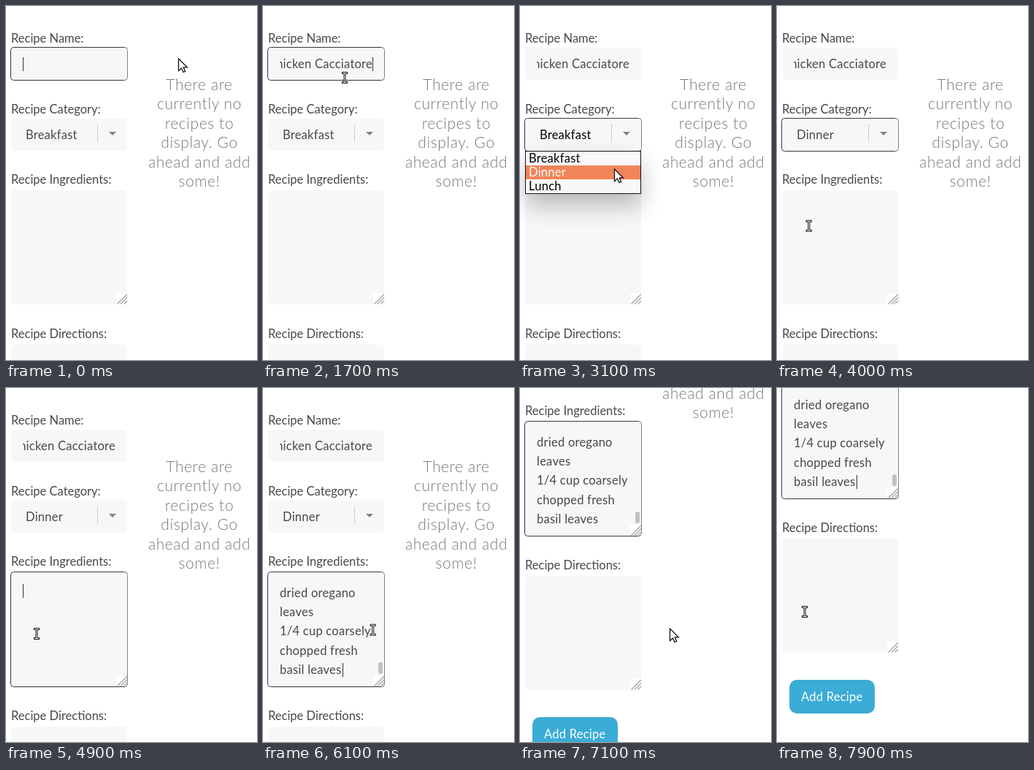
These frames come from a looping animation (344 by 484 pixels, 8000 ms). An HTML page:

```html
<!DOCTYPE html>
<html lang="en">
<head>
<meta charset="utf-8">
<title>Recipe form</title>
<style>
  html, body { margin: 0; width: 100%; height: 100%; overflow: hidden; background: #fff; }
  svg { display: block; width: 344px; height: 484px; }
  text { font: 16.5px Lato, "Open Sans", sans-serif; letter-spacing: .25px; fill: #484848; white-space: pre; }
  .label { letter-spacing: 0; }
  .field { fill: #f7f7f7; }
  .ring { fill: none; stroke: url(#edge); }
  .caret { fill: #333; }
  .note text { font-size: 21px; font-weight: 300; letter-spacing: .6px; fill: #777; text-anchor: middle; }
  .name { text-anchor: end; }
  .menu text { fill: #000; }
  .btn { fill: #fff; }

  /* Everything runs on one 8 s clock: 1.25% = 100 ms */
  .run { animation: 8s step-end infinite; }

  .page { animation-name: scroll; }
  @keyframes scroll {
    0% { transform: translateY(0); }
    82.5% { transform: translateY(-4px); }
    83.75% { transform: translateY(-17px); }
    85% { transform: translateY(-55px); }
    86.25% { transform: translateY(-108px); }
    87.5% { transform: translateY(-161px); }
    88.75% { transform: translateY(-206px); }
    90% { transform: translateY(-236px); }
    91.25% { transform: translateY(-252px); }
    92.5%, 100% { transform: translateY(-257px); }
  }

  .pointer { animation-name: move; }
  @keyframes move {
    0% { transform: translate(236px, 71px); }
    1.25% { transform: translate(236px, 71px); animation-timing-function: steps(5, start); }
    7.5% { transform: translate(106px, 96px); }
    21.25% { transform: translate(112px, 98px); }
    22.5% { transform: translate(112px, 98px); animation-timing-function: steps(5, start); }
    28.75% { transform: translate(142px, 172px); }
    33.75% { transform: translate(142px, 172px); animation-timing-function: steps(5, start); }
    40% { transform: translate(129px, 222px); }
    48.75% { transform: translate(129px, 222px); animation-timing-function: steps(3, start); }
    52.5% { transform: translate(1px, 340px); }
    53.75% { transform: translate(1px, 340px); animation-timing-function: steps(5, start); }
    60% { transform: translate(42px, 336px); }
    70% { transform: translate(42px, 336px); animation-timing-function: steps(9, start); }
    81.25% { transform: translate(205px, 328px); }
    95% { transform: translate(205px, 328px); animation-timing-function: steps(4, start); }
    100% { transform: translate(38px, 306px); }
  }
  .arrow { animation-name: arrow; }
  @keyframes arrow {
    0%, 22.5%, 51.25%, 77.5% { opacity: 1; }
    3.75%, 48.75%, 53.75%, 95%, 100% { opacity: 0; }
  }
  .beam { animation-name: beam; }
  @keyframes beam {
    0%, 22.5%, 51.25%, 77.5% { opacity: 0; }
    3.75%, 48.75%, 53.75%, 95%, 100% { opacity: 1; }
  }

  .name-ring { animation-name: name-ring; }
  @keyframes name-ring { 0% { opacity: 1; } 30%, 100% { opacity: 0; } }
  .cat-ring { animation-name: cat-ring; }
  @keyframes cat-ring { 0%, 61.25%, 100% { opacity: 0; } 30% { opacity: 1; } }
  .list-ring { animation-name: list-ring; }
  @keyframes list-ring { 0% { opacity: 0; } 61.25%, 100% { opacity: 1; } }

  .name-start { animation-name: name-start; }
  @keyframes name-start { 0% { opacity: 1; } 10%, 100% { opacity: 0; } }
  .name-end { animation-name: name-end; }
  @keyframes name-end { 0%, 22.5%, 100% { opacity: 0; } 15% { opacity: 1; } }
  .name { animation-name: name; }
  @keyframes name { 0% { opacity: 0; } 15%, 100% { opacity: 1; } }

  .old-cat { animation-name: old-cat; }
  @keyframes old-cat { 0% { opacity: 1; fill: #484848; } 30% { opacity: 1; fill: #000; } 43.75%, 100% { opacity: 0; } }
  .new-cat { animation-name: new-cat; }
  @keyframes new-cat { 0% { opacity: 0; } 43.75%, 100% { opacity: 1; } }
  .menu { animation-name: menu; }
  @keyframes menu { 0%, 43.75%, 100% { opacity: 0; } 30% { opacity: 1; } }
  .mark { fill: #f28459; animation-name: mark; }
  @keyframes mark { 0% { transform: translateY(0); } 38.75%, 100% { transform: translateY(19px); } }
  .menu .row1 { animation-name: row1; }
  @keyframes row1 { 0% { fill: #fff; } 38.75%, 100% { fill: #000; } }
  .menu .row2 { animation-name: row2; }
  @keyframes row2 { 0% { fill: #000; } 38.75%, 100% { fill: #fff; } }

  .list-start { animation-name: list-start; }
  @keyframes list-start { 0%, 67.5%, 100% { opacity: 0; } 61.25% { opacity: 1; } }
  .list { animation-name: list; }
  @keyframes list { 0% { opacity: 0; } 67.5%, 100% { opacity: 1; } }
  .list-end { animation-name: list-end; }
  @keyframes list-end {
    0%, 70%, 82.5% { opacity: 0; }
    67.5%, 76.25%, 91.25%, 100% { opacity: 1; }
  }
</style>
</head>
<body>
<svg width="344" height="484" viewBox="0 0 344 484">
  <defs>
    <linearGradient id="edge">
      <stop offset=".96" stop-color="#363645"/>
      <stop offset="1" stop-color="#808080"/>
    </linearGradient>
    <clipPath id="nameBox"><rect x="23" y="60" width="130" height="38"/></clipPath>
    <g id="area">
      <rect class="field" width="159" height="156" rx="5"/>
      <path d="M144 141h15v15h-15z" fill="#fff"/>
      <path d="M145.5 155.5L159 142M150 155.5L159 146.5M154.5 155.5L159 151" stroke="#aaa" stroke-width="1.5"/>
    </g>
  </defs>

  <g class="run page">
    <text class="label" x="7" y="50">Recipe Name:</text>
    <rect class="field" x="7" y="57" width="159" height="44" rx="5"/>
    <rect class="run ring name-ring" x="6.5" y="56.5" width="160" height="45" rx="4"/>
    <g clip-path="url(#nameBox)"><text class="run name" x="150" y="84.5">Chicken Cacciatore</text></g>
    <rect class="run caret name-start" x="23" y="70" width="1" height="19"/>
    <rect class="run caret name-end" x="150" y="70" width="1" height="19"/>

    <text class="label" x="7" y="147">Recipe Category:</text>
    <rect class="field" x="7" y="154" width="159" height="44" rx="5"/>
    <rect class="run ring cat-ring" x="6.5" y="153.5" width="160" height="45" rx="4"/>
    <text class="run old-cat" x="27" y="182">Breakfast</text>
    <text class="run new-cat" x="27" y="182">Dinner</text>
    <path d="M125.5 162v24" stroke="#ccc"/>
    <path d="M141 172h10l-5 5z" fill="#8a8078"/>

    <text class="label" x="7" y="243">Recipe Ingredients:</text>
    <use href="#area" x="7" y="252"/>
    <rect class="run ring list-ring" x="6.5" y="251.5" width="160" height="157" rx="4"/>
    <rect class="run caret list-start" x="23" y="268" width="1" height="19"/>
    <g class="run list">
      <text x="23" y="285.6">dried oregano</text>
      <text x="23" y="312">leaves</text>
      <text x="23" y="338.4">1/4 cup coarsely</text>
      <text x="23" y="364.8">chopped fresh</text>
      <text x="23" y="391">basil leaves</text>
      <rect x="158" y="375" width="6" height="16" rx="3" fill="#c1c1c1"/>
    </g>
    <rect class="run caret list-end" x="109" y="376" width="1" height="19"/>

    <text class="label" x="7" y="454">Recipe Directions:</text>
    <use href="#area" x="7" y="463"/>

    <rect x="17" y="656" width="117" height="46" rx="10" fill="#3aacd6"/>
    <text class="btn" x="33" y="685">Add Recipe</text>

    <g class="note">
      <text x="265" y="115">There are</text>
      <text x="265" y="141.4">currently no</text>
      <text x="265" y="167.8">recipes to</text>
      <text x="265" y="194.2">display. Go</text>
      <text x="265" y="220.6">ahead and add</text>
      <text x="265" y="247">some!</text>
    </g>

    <g class="run menu">
      <rect x="7" y="214" width="159" height="59" opacity=".25" style="filter: blur(16px)"/>
      <rect x="7.5" y="198.5" width="158" height="58" fill="#f8f8f8" stroke="#111"/>
      <rect class="run mark" x="8" y="199" width="157" height="19"/>
      <text class="run row1" x="12" y="214">Breakfast</text>
      <text class="run row2" x="12" y="233">Dinner</text>
      <text x="12" y="252">Lunch</text>
    </g>
  </g>

  <g class="run pointer">
    <path class="run arrow" d="M.5 1V17.5L4.4 14 7 19.5 9.6 18.4 7.2 12.8H12.3z" fill="#fff" stroke="#111" stroke-width="1.3"/>
    <g class="run beam" fill="none">
      <path d="M-4 -6.5H4M-4 6.5H4M0 -6.5V6.5" stroke="#111" stroke-width="3"/>
      <path d="M-3 -6.5H3M-3 6.5H3M0 -6.5V6.5" stroke="#fff"/>
    </g>
  </g>
</svg>
</body>
</html>
```
